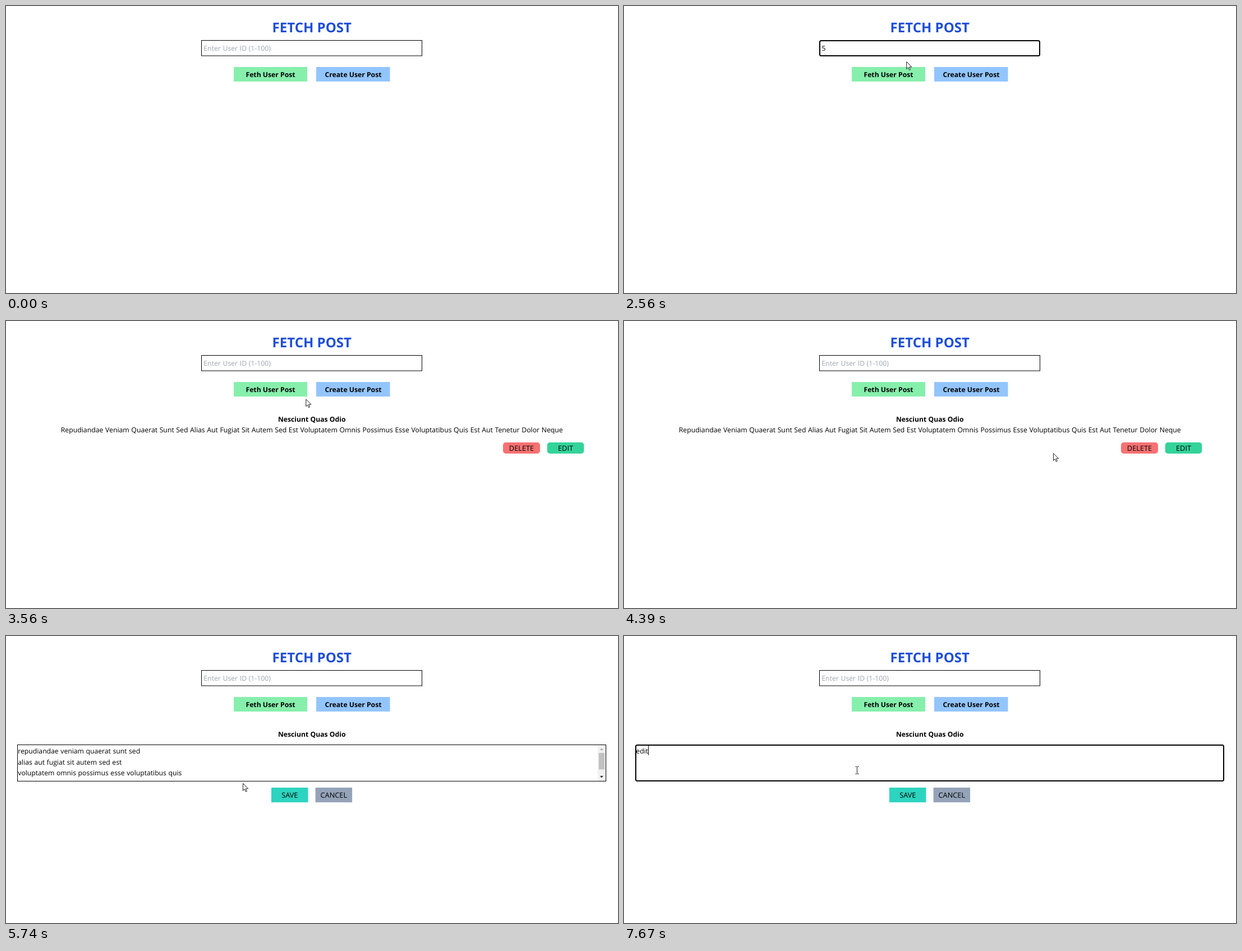
An HTML page that plays this animation: 1091 px wide and 513 px high, repeating every 8 s.

```html
<!DOCTYPE html>
<html lang="en">
<head>
<meta charset="utf-8">
<title>Fetch post</title>
<style>
  html, body { margin: 0; width: 100%; height: 100%; overflow: hidden; background: #fff; }
  svg { display: block; width: 1091px; height: 513px; }
  text { font: 12.28px "Open Sans", "Noto Sans", sans-serif; word-spacing: .4px; text-rendering: geometricPrecision; }
  .mid { text-anchor: middle; }
  .bold { font-weight: 700; font-size: 12.2px; word-spacing: 0; }
  .caps { font-weight: 500; font-size: 12.8px; text-anchor: middle; }
  .head { font-weight: 700; font-size: 24.05px; word-spacing: 0; fill: #1d4ed8; }
  .body text { font-size: 12.2px; }
  .line { fill: none; stroke: #000; }
  .ring { fill: none; stroke: #000; stroke-width: 2; }
</style>
</head>
<body>
<svg viewBox="0 0 1091 513">
  <defs>
    <clipPath id="areaClip"><rect x="21" y="195" width="1048" height="64"/></clipPath>
  </defs>

  <g id="page">
    <text class="head mid" x="545.3" y="46.8">FETCH POST</text>
    <rect id="inputBorder" class="line" x="348.5" y="61.5" width="393" height="27.5"/>
    <rect id="inputRing" class="ring" x="349" y="62" width="392" height="27" rx="2.5"/>
    <text id="hint" x="352.3" y="80.3" fill="#9ca3af">Enter User ID (1-100)</text>
    <text id="typed" x="352.6" y="80.3">5</text>
    <rect x="406" y="109" width="131" height="26" fill="#86efac"/>
    <rect x="553" y="109" width="131.5" height="26" fill="#93c5fd"/>
    <text class="bold mid" x="471.5" y="127">Feth User Post</text>
    <text class="bold mid" x="619" y="127">Create User Post</text>
  </g>

  <text id="loading" x="40.6" y="7.6" text-anchor="end" fill="#463840" style="font-size:12.8px">LOADING</text>

  <text id="title" class="bold mid" x="545.2" y="179.5">Nesciunt Quas Odio</text>

  <g id="post">
    <text class="mid" x="545.2" y="199.3">Repudiandae Veniam Quaerat Sunt Sed Alias Aut Fugiat Sit Autem Sed Est Voluptatem Omnis Possimus Esse Voluptatibus Quis Est Aut Tenetur Dolor Neque</text>
    <rect x="886" y="217" width="66" height="20" rx="5" fill="#f87171"/>
    <rect x="964.7" y="217" width="65.6" height="20" rx="5" fill="#34d399"/>
    <text class="caps" x="919" y="231.7">DELETE</text>
    <text class="caps" x="997.5" y="231.7">EDIT</text>
  </g>

  <g id="editor">
    <g clip-path="url(#areaClip)">
      <g id="selection" fill="#3390ff">
        <rect x="21" y="195" width="222" height="19.6"/>
        <rect x="21" y="214.6" width="189" height="19.7"/>
        <rect x="21" y="234.3" width="297" height="19.7"/>
        <rect x="21" y="254" width="159" height="5"/>
      </g>
      <g id="lines" class="body">
        <text x="21.3" y="209.8">repudiandae veniam quaerat sunt sed</text>
        <text x="21.3" y="229.5">alias aut fugiat sit autem sed est</text>
        <text x="21.3" y="249.2">voluptatem omnis possimus esse voluptatibus quis</text>
      </g>
      <path id="squiggle" fill="none" stroke="#b8325f" stroke-width=".9"/>
      <text id="edited" x="21.3" y="209.8"></text>
    </g>
    <g id="scrollbar">
      <rect x="1055" y="195" width="14" height="64" fill="#f1f1f1"/>
      <rect x="1056.7" y="209" width="10.5" height="29.5" fill="#c1c1c1"/>
      <path d="M1058.8 204h6l-3-3.4z" fill="#a3a3a3"/>
      <path d="M1058.8 250h6l-3 3.4z" fill="#303030"/>
    </g>
    <rect id="areaBorder" class="line" x="20.5" y="194.5" width="1049" height="65"/>
    <rect id="areaRing" class="ring" x="21" y="195" width="1048" height="64" rx="2.5"/>
    <rect x="473" y="271" width="65.5" height="26.3" fill="#2dd4bf"/>
    <rect x="551.6" y="271" width="65.5" height="26.3" fill="#94a3b8"/>
    <text class="caps" x="505.8" y="289.4">SAVE</text>
    <text class="caps" x="584.3" y="289.4">CANCEL</text>
  </g>

  <rect id="caret" width="1" height="17"/>

  <g id="pointer" stroke="#111" stroke-width=".95">
    <path id="arrow" fill="#fff" d="M.5.6V13.4L3.4 10.7 5.4 15.4 7.4 14.5 5.4 9.9H9.6Z"/>
    <path id="hand" fill="#fff" d="M-1.2 8V1Q0-.6 1.2 1V5.4Q2.5 4.6 3.6 5.8 5 5 6 6.4 7.6 6 8 7.4V11Q7.6 13 6.4 14.8H-.2Q-1.8 12-3.8 9.6-4-.2+8-2.6 7.6-1.2 9Z"/>
    <path id="beam" fill="none" d="M-3-6.5H-.8L0-5.8.8-6.5H3M0-5.8V5.8M-3 6.5H-.8L0 5.8.8 6.5H3"/>
  </g>
</svg>

<script>
const LOOP = 8000;
const el = id => document.getElementById(id);
const show = (id, on) => el(id).setAttribute("visibility", on ? "inherit" : "hidden");
const within = (t, a, b) => t >= a && t < b;

// Pointer moves: start, end, number of steps, then a quadratic curve.
const moves = [
  { a: 190, b: 810, n: 9, path: [[816, 428], [601, 341], [503.5, 71.5]] },
  { a: 2350, b: 2760, n: 6, path: [[503.5, 74], [505, 95], [501, 113]] },
  { a: 3430, b: 4130, n: 9, path: [[501, 113], [600, 200], [757, 224]] },
  { a: 4390, b: 4870, n: 7, path: [[765, 236], [880, 250], [992, 226]] },
  { a: 5330, b: 5734, n: 6, path: [[975, 232], [720, 322], [422, 263]] },
  { a: 5734, b: 5936, n: 3, path: [[422, 263], [418, 252], [415.5, 240]] }
];
const typing = [[7140, "e"], [7340, "ed"], [7540, "edi"], [7670, "edit"]];

const inputBox = [348, 61, 742, 90];
const areaBox = [20, 194, 1070, 260];
const topButtons = [[406, 109, 537, 135], [553, 109, 685, 135]];
const postButtons = [[886, 217, 952, 237], [965, 217, 1030, 237]];
const editButtons = [[473, 271, 539, 297], [552, 271, 617, 297]];
const inside = ([x, y], [l, t, r, b]) => x >= l && x <= r && y >= t && y <= b;

let wave = "M21.5 251.4";
for (let i = 1; i <= 146; i++) wave += `L${21.5 + i * 2} ${251.4 + (i % 2) * 1.1}`;
el("squiggle").setAttribute("d", wave);
el("hand").setAttribute("d",
  "M-1.2 8V1Q0-.6 1.2 1V5.4Q2.5 4.6 3.6 5.8 5 5 6 6.4 7.6 6 8 7.4V11Q7.6 13 6.4 14.8H-.2Q-1.8 12-3.8 9.6-4 8-2.6 7.8Z");

function pointerAt(t) {
  const m = moves.filter(k => t >= k.a).pop();
  if (!m) return null;
  const step = Math.min(m.n, Math.floor((t - m.a) * m.n / (m.b - m.a) + 1e-6));
  const s = step / m.n;
  const u = s * (2 - s) * .5 + s * .5;
  const [p, q, r] = m.path;
  return [0, 1].map(i => (1 - u) ** 2 * p[i] + 2 * u * (1 - u) * q[i] + u * u * r[i]);
}

function cursorKind(p, loading, posted, editing) {
  if (loading) return "arrow";
  if (inside(p, inputBox) || editing && inside(p, areaBox)) return "beam";
  const buttons = topButtons.concat(editing ? editButtons : posted ? postButtons : []);
  return buttons.some(b => inside(p, b)) ? "hand" : "arrow";
}

function drawCaret(t) {
  const typed = typing.filter(k => t >= k[0]).pop();
  el("edited").textContent = typed ? typed[1] : "";
  let at = null;
  if (within(t, 1010, 1550)) at = [352, 67];
  else if (within(t, 1880, 2410)) at = [360, 67];
  else if (within(t, 6003, 6540)) at = [315, 236];
  else if (typed) at = [Math.round(21 + el("edited").getComputedTextLength()), 196];
  show("caret", at);
  if (at) {
    el("caret").setAttribute("x", at[0]);
    el("caret").setAttribute("y", at[1]);
  }
}

function draw(t) {
  const loading = within(t, 3032, 3430);
  const posted = t >= 3430;
  const editing = t >= 5002;
  const cleared = t >= 7140;
  const selected = within(t, 6540, 7140);
  const inputFocus = within(t, 1010, 2960);
  const areaFocus = t >= 6003;
  const hasInput = within(t, 1880, 3032);

  show("page", !loading);
  show("loading", loading);
  show("inputBorder", !inputFocus);
  show("inputRing", inputFocus);
  show("hint", !hasInput);
  show("typed", hasInput);
  show("title", posted);
  show("post", posted && !editing);
  show("editor", editing);
  show("areaBorder", !areaFocus);
  show("areaRing", areaFocus);
  show("lines", !cleared);
  show("scrollbar", !cleared);
  show("selection", selected);
  show("squiggle", within(t, 6670, 7140));
  el("lines").setAttribute("fill", selected ? "#fff" : "#000");
  drawCaret(t);

  const p = pointerAt(t);
  show("pointer", p);
  if (p) {
    el("pointer").setAttribute("transform", `translate(${p[0]} ${p[1]})`);
    const kind = cursorKind(p, loading, posted, editing);
    for (const id of ["arrow", "hand", "beam"]) show(id, id === kind);
  }
}

const start = performance.now();
function tick() {
  draw((performance.now() - start) % LOOP);
  requestAnimationFrame(tick);
}
tick();
</script>
</body>
</html>
```
